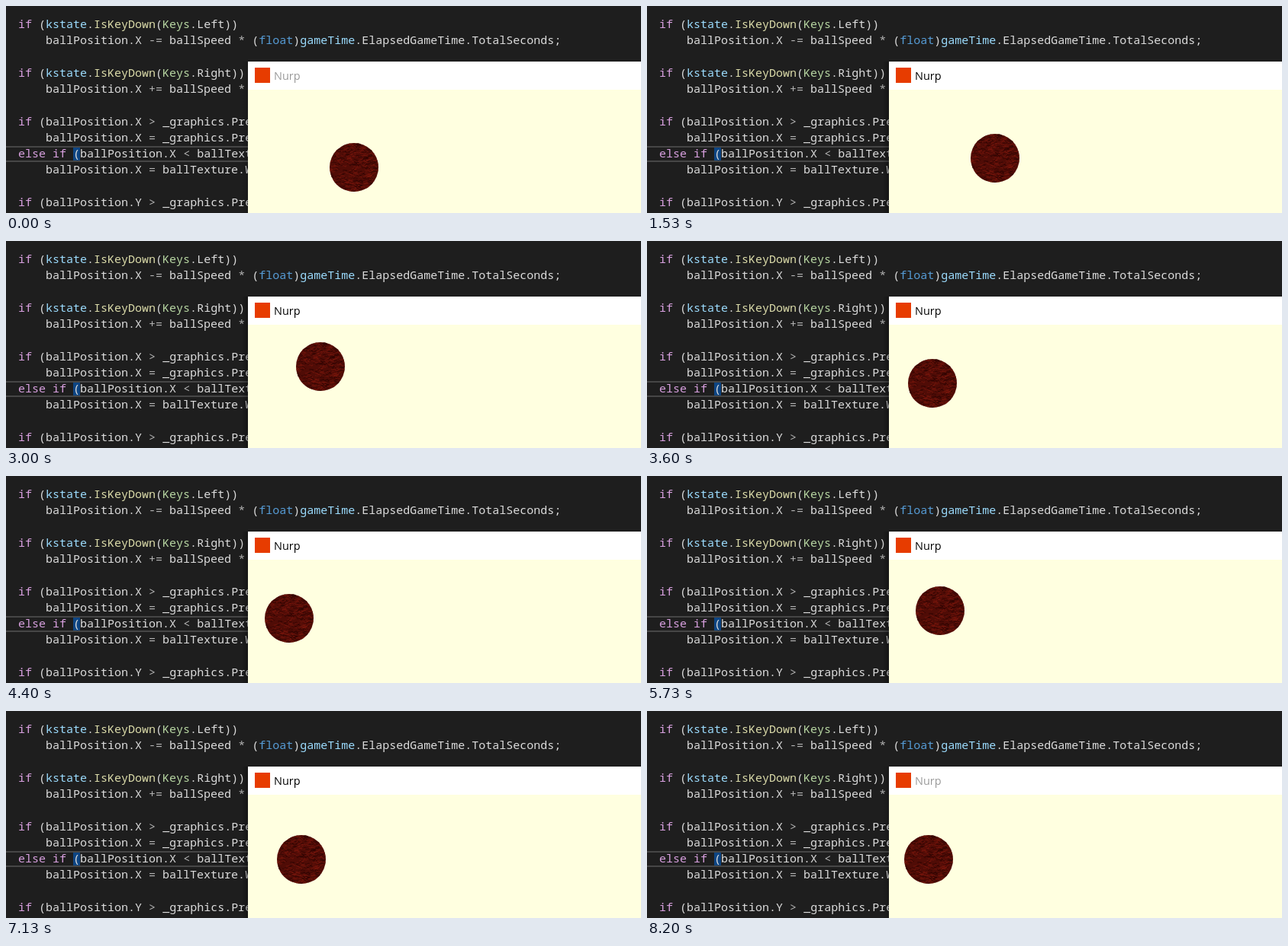
Animation of 832x272 px, one loop 8540 ms. Source, as an HTML page:

```html
<!DOCTYPE html>
<html lang="en">
<head>
<meta charset="utf-8">
<title>Nurp</title>
<style>
  html, body { margin: 0; width: 100%; height: 100%; overflow: hidden; background: #1e1e1e; }
  svg { display: block; }
  .code { font: 500 15px "Noto Sans Mono", "DejaVu Sans Mono", monospace; fill: #dcdcdc; white-space: pre; }
  .title { font: 14.5px "Open Sans", "Noto Sans", sans-serif; }
</style>
</head>
<body>
<svg width="832" height="272" viewBox="0 0 832 272">
  <defs>
    <clipPath id="disc"><circle cx="32" cy="32" r="32"/></clipPath>
    <linearGradient id="shadow">
      <stop offset="0" stop-opacity="0"/>
      <stop offset="1" stop-opacity=".3"/>
    </linearGradient>
  </defs>
  <rect width="832" height="272" fill="#1e1e1e"/>
  <path d="M0 185H317M0 204H317" stroke="#464646" stroke-width="2"/>
  <rect x="88" y="186" width="9" height="17" fill="#0e4583"/>
  <g id="code" class="code"></g>

  <rect id="edge" x="308" y="73" width="9" height="199" fill="url(#shadow)"/>
  <rect x="317" y="73" width="515" height="37" fill="#fff"/>
  <rect x="317" y="110" width="515" height="162" fill="#ffffe0"/>
  <rect x="326" y="81" width="20" height="20" fill="#e73c00"/>
  <text id="title" class="title" x="351" y="97">Nurp</text>
  <g id="ball" clip-path="url(#disc)">
    <rect width="64" height="64" fill="#500c06"/>
    <g id="grain" fill="none" stroke-linecap="round"></g>
  </g>
</svg>
<script>
const LOOP = 8540;
const byId = id => document.getElementById(id);

function add(parent, tag, attrs, text) {
  const node = document.createElementNS("http://www.w3.org/2000/svg", tag);
  for (const name in attrs) node.setAttribute(name, attrs[name]);
  if (text) node.textContent = text;
  return parent.appendChild(node);
}

const lines = [
  "if (kstate.IsKeyDown(Keys.Left))",
  "    ballPosition.X -= ballSpeed * (float)gameTime.ElapsedGameTime.TotalSeconds;",
  "",
  "if (kstate.IsKeyDown(Keys.Right))",
  "    ballPosition.X += ballSpeed * ",
  "",
  "if (ballPosition.X > _graphics.Pref",
  "    ballPosition.X = _graphics.Pref",
  "else if (ballPosition.X < ballTextu",
  "    ballPosition.X = ballTexture.Wi",
  "",
  "if (ballPosition.Y > _graphics.Pref"
];
const colors = {
  if: "#d8a0df", else: "#d8a0df", float: "#569cd6", kstate: "#9cdcfe",
  gameTime: "#9cdcfe", IsKeyDown: "#dcdcaa", Keys: "#b8d7a3"
};
const isOperator = word => /^[-+*<>=]/.test(word);

lines.forEach((line, row) => {
  const source = line.trimStart();
  const text = add(byId("code"), "text", {
    x: 16 + 9 * (line.length - source.length), y: 29 + 21.27 * row
  });
  for (const word of source.match(/\w+|[-+*<>=]+|[^\w\-+*<>=]+/g) || []) {
    const fill = isOperator(word) ? "#b4b4b4" : colors[word];
    add(text, "tspan", fill ? { fill } : {}, word);
  }
});

// Leather grain: fine wavy creases, dark with red highlights
let seed = 4711;
const random = () => (seed = seed * 16807 % 2147483647) / 2147483647;
const bend = () => (random() * 3 - 1.5).toFixed(1);
for (let i = 0; i < 420; i++) {
  const x = (random() * 66 - 3).toFixed(1), y = (random() * 64).toFixed(1);
  add(byId("grain"), "path", {
    d: `M${x} ${y}q1.5 ${bend()} 3 ${bend()}t2 ${bend()}`,
    stroke: i % 2 ? "#7a170d" : "#2e0502",
    "stroke-width": .8
  });
}

// Arrow keys held down: direction, from, to
const holds = [
  ["up", 1410, 2200],
  ["left", 2380, 2820], ["down", 2770, 3220], ["left", 3220, 3900],
  ["right", 4180, 4530], ["up", 4530, 5100],
  ["down", 5385, 5915], ["left", 5915, 6085], ["right", 6125, 6385]
];
const TAP = 170, tapStart = 6385, taps = 4, tapEnd = tapStart + taps * TAP;
for (let i = 0; i < taps; i++)
  holds.push([i % 2 ? "right" : "left", tapStart + i * TAP, tapStart + (i + 1) * TAP]);
holds.push(["left", tapEnd, tapEnd + 240]);

const SPEED = .1, LEFT = 317, TOP = 110;
const along = { left: [-1, 0], right: [1, 0], up: [0, -1], down: [0, 1] };

function position(t) {
  let x = 424, y = 180;
  for (const [key, from, to] of holds) {
    const travel = SPEED * Math.max(0, Math.min(t, to) - from);
    x = Math.max(LEFT, x + along[key][0] * travel);
    y = Math.max(TOP, y + along[key][1] * travel);
  }
  return [Math.round(x), Math.round(y)];
}

// The screen refreshes 15 times a second, on a 10 ms grid
function tick(t) {
  const at = k => Math.round(k * 20 / 3) * 10;
  const k = Math.floor((t + 4) * 3 / 200);
  return at(k) > t ? at(k - 1) : at(k);
}

function draw(t) {
  const active = t >= 1200 && t < 8200;
  byId("title").setAttribute("fill", active ? "#000" : "#999");
  byId("edge").setAttribute("opacity", active ? 1 : .5);
  byId("ball").setAttribute("transform", `translate(${position(tick(t))})`);
}

const start = performance.now();
function frame() {
  draw((performance.now() - start) % LOOP);
  requestAnimationFrame(frame);
}
frame();
</script>
</body>
</html>
```
